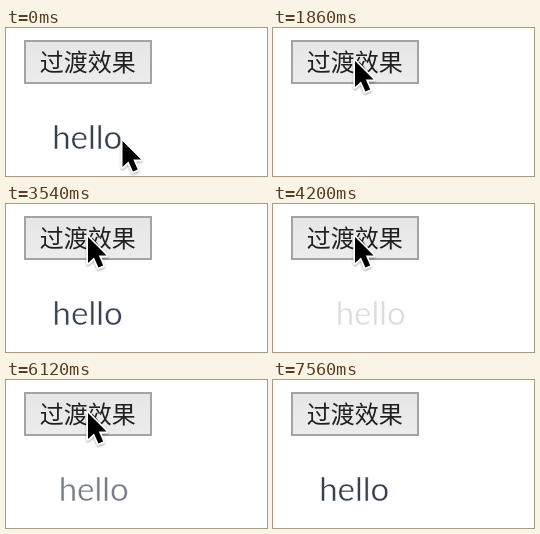
These frames come from a looping animation (261 by 148 pixels, 7920 ms). An HTML page:

```html
<!DOCTYPE html>
<html lang="zh">
<head>
<meta charset="utf-8">
<title>过渡效果</title>
<style>
  html, body { margin: 0; width: 100%; height: 100%; overflow: hidden; background: #fff; }
  svg { display: block; width: 100vw; height: 100vh; }
  .label { font: 24px "Noto Sans CJK SC", "Noto Sans CJK", sans-serif; fill: #202020; }
  /* the white outline thins the letters */
  .hello { font: 33px Lato, sans-serif; fill: #36414f; stroke: #fff; stroke-width: .5px; }
</style>
</head>
<body>
<svg viewBox="0 0 261 148">
  <defs>
    <linearGradient id="up" x2="0" y2="1">
      <stop stop-color="#e6e6e6"/><stop offset="1" stop-color="#ececec"/>
    </linearGradient>
    <linearGradient id="down" x2="0" y2="1">
      <stop stop-color="#dcdcdc"/><stop offset="1" stop-color="#e2e2e2"/>
    </linearGradient>
    <filter id="shade" x="-40%" y="-30%" width="180%" height="170%">
      <feDropShadow dx="0" dy="1.5" stdDeviation="1.2" flood-opacity=".35"/>
    </filter>
  </defs>
  <rect id="button" x="19" y="13" width="126" height="42" fill="url(#up)" stroke="#a3a3a3" stroke-width="2"/>
  <text class="label" x="33.7" y="42.7">过渡效果</text>
  <text class="hello" id="hello" x="46.2" y="120.5">hello</text>
  <g id="cursor" filter="url(#shade)">
    <path d="M0 0V26L6 20.4 10.4 30.6 15.2 28.6 10.8 18.6H18.6Z" stroke="#fff" stroke-width="3.2" stroke-linejoin="round" paint-order="stroke"/>
  </g>
</svg>
<script>
const LOOP = 7920, STEP = 60, SHIFT = 20;
const [button, hello, cursor] = ['button', 'hello', 'cursor'].map(id => document.getElementById(id));

function bezier(x1, y1, x2, y2) {
  const at = (a, b, s) => 3 * (1 - s) ** 2 * s * a + 3 * (1 - s) * s * s * b + s ** 3;
  return x => {
    if (x <= 0) return 0;
    if (x >= 1) return 1;
    let lo = 0, hi = 1;
    for (let i = 0; i < 24; i++) {
      const mid = (lo + hi) / 2;
      if (at(x1, x2, mid) < x) lo = mid; else hi = mid;
    }
    return at(y1, y2, lo);
  };
}

const ease = bezier(.25, .1, .25, 1);
const enter = { ms: 300, hidden: k => 1 - ease(k) };
const leave = { ms: 800, hidden: bezier(1, .5, .8, 1) };

// press and start times of every click, with the transition it triggers
const clicks = [
  { press: 1030, start: 1044, move: leave },
  { press: 2340, start: 2420, move: enter },
  { press: 3490, start: 3510, move: leave },
  { press: 4800, start: 4880, move: enter },
  { press: 5700, start: 5720, move: leave },
  { press: 7140, start: 7220, move: enter }
];

function cursorAt(t) {
  if (t < 60) return [116.5, 113];
  if (t < 780 || t >= 7560) return null;
  const k = 1 - (1 - Math.min(1, (t - 720) / 360)) ** 2;
  return [-30 + 112 * k, 20 + 13 * k];
}

function draw(t) {
  const last = clicks.filter(c => t >= c.start).pop();
  const hidden = last ? last.move.hidden((t - last.start) / last.move.ms) : 0;
  hello.setAttribute('transform', `translate(${SHIFT * hidden} 0)`);
  hello.setAttribute('opacity', 1 - hidden);

  const pressed = clicks.some(c => t >= c.press && t < c.start);
  button.setAttribute('fill', pressed ? 'url(#down)' : 'url(#up)');

  const pos = cursorAt(t);
  cursor.setAttribute('visibility', pos ? 'visible' : 'hidden');
  if (pos) cursor.setAttribute('transform', `translate(${pos})`);
}

const begin = performance.now();
function tick() {
  const t = (performance.now() - begin) % LOOP;
  draw(Math.floor(t / STEP) * STEP);
  requestAnimationFrame(tick);
}
tick();
</script>
</body>
</html>
```
